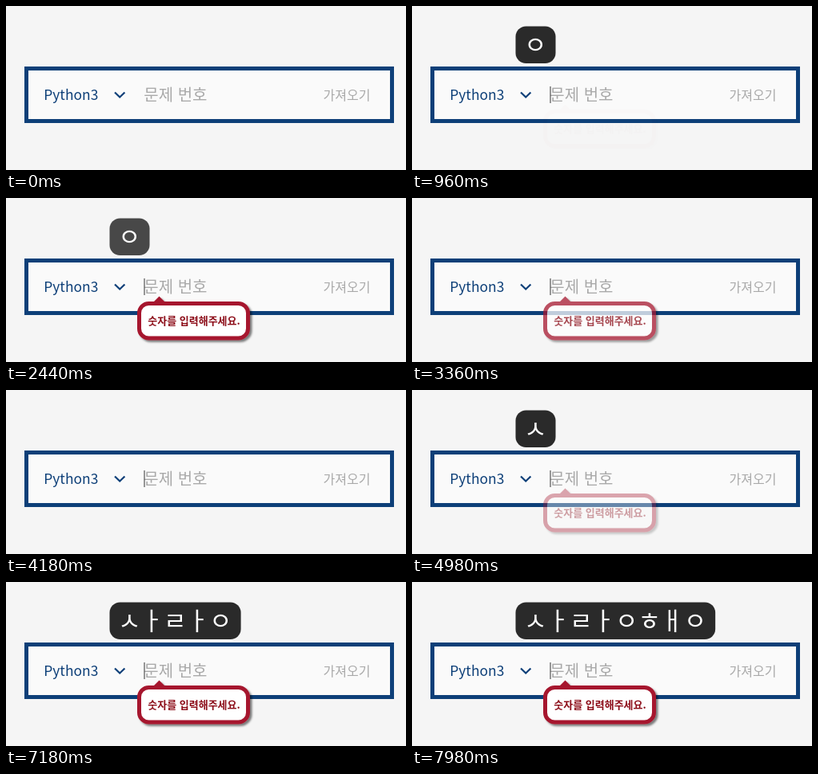
An HTML page for the animation above (8000 ms loop, 500 by 206 pixels).

```html
<!DOCTYPE html>
<html lang="ko">
<head>
<meta charset="utf-8">
<style>
  html, body { margin: 0; width: 100%; height: 100%; overflow: hidden; background: #f5f5f5; }
  svg { display: block; width: 500px; height: 206px; }
  text { font-family: "Noto Sans CJK KR", "Noto Sans CJK", "Noto Sans CJK JP", sans-serif; white-space: pre; }
  .hint { fill: #a9a9a9; font-weight: 300; }
</style>
</head>
<body>
<svg viewBox="0 0 500 206">
  <defs>
    <filter id="shadow" x="-10%" y="-20%" width="125%" height="150%">
      <feDropShadow dx="2.5" dy="2.5" stdDeviation="1" flood-color="#000" flood-opacity=".5"/>
    </filter>
  </defs>

  <rect x="25.5" y="78.5" width="457" height="66" fill="#fafafa" stroke="#0d3f78" stroke-width="5"/>
  <text x="47.3" y="118" font-size="17.4" fill="#0d3f78">Python3</text>
  <path d="M136 108.5l6.2 6 6.2-6" fill="none" stroke="#0d3f78" stroke-width="2.2"/>
  <text class="hint" x="172.3" y="118.5" font-size="20">문제 번호</text>
  <text class="hint" x="396.5" y="117.5" font-size="16">가져오기</text>
  <rect id="caret" x="172.5" y="101" width="1" height="21" fill="#333"/>

  <g id="tip">
    <g filter="url(#shadow)">
      <path d="M183 132l8.5-8.5 8.5 8.5z" fill="#a6192e"/>
      <rect x="166.5" y="132.5" width="136" height="43.5" rx="12" fill="#fff" stroke="#a6192e" stroke-width="5"/>
    </g>
    <text x="235" y="159" font-size="13" font-weight="700" text-anchor="middle" fill="#8c0c18">숫자를 입력해주세요.</text>
  </g>

  <g id="keys">
    <rect id="plate" x="129.5" y="25.5" height="46.5" rx="13" fill="#2a2a2a"/>
    <text id="typed" x="140" y="60" font-size="31" font-weight="500" fill="#fff"></text>
  </g>
</svg>
<script>
const LOOP = 8000, KEY_W = 28.52;
const $ = id => document.getElementById(id);
const ramp = (t, start, dur) => Math.min(1, Math.max(0, (t - start) / dur));

const first = 960;
const phrase = 'ㅅㅏㄹㅏㅇㅎㅐㅇ';
const strokes = [4900, 5400, 5900, 6400, 6860, 7240, 7560, 7880];

// The caret blinks once a second and restarts on every key.
function caretOn(t) {
  if (t < first) return t >= 440;
  const last = [first, ...strokes].filter(s => s <= t).pop();
  return (t - last) % 1000 < 500;
}

function draw(t) {
  const count = strokes.filter(s => s <= t).length;
  const text = count ? phrase.slice(0, count) : 'ㅇ';
  const shown = count ? 1 : t < first ? 0 : 1 - ramp(t, 2340, 680);
  const tip = ramp(t, first, 150) - ramp(t, 3322, 150) + ramp(t, 4925, 150);

  $('caret').style.opacity = caretOn(t) ? 1 : 0;
  $('tip').style.opacity = tip;
  $('keys').style.opacity = shown;
  $('plate').setAttribute('width', 21.5 + KEY_W * text.length);
  if ($('typed').textContent !== text) $('typed').textContent = text;
}

const begin = performance.now();
function frame() {
  draw((performance.now() - begin) % LOOP);
  requestAnimationFrame(frame);
}
frame();
</script>
</body>
</html>
```
